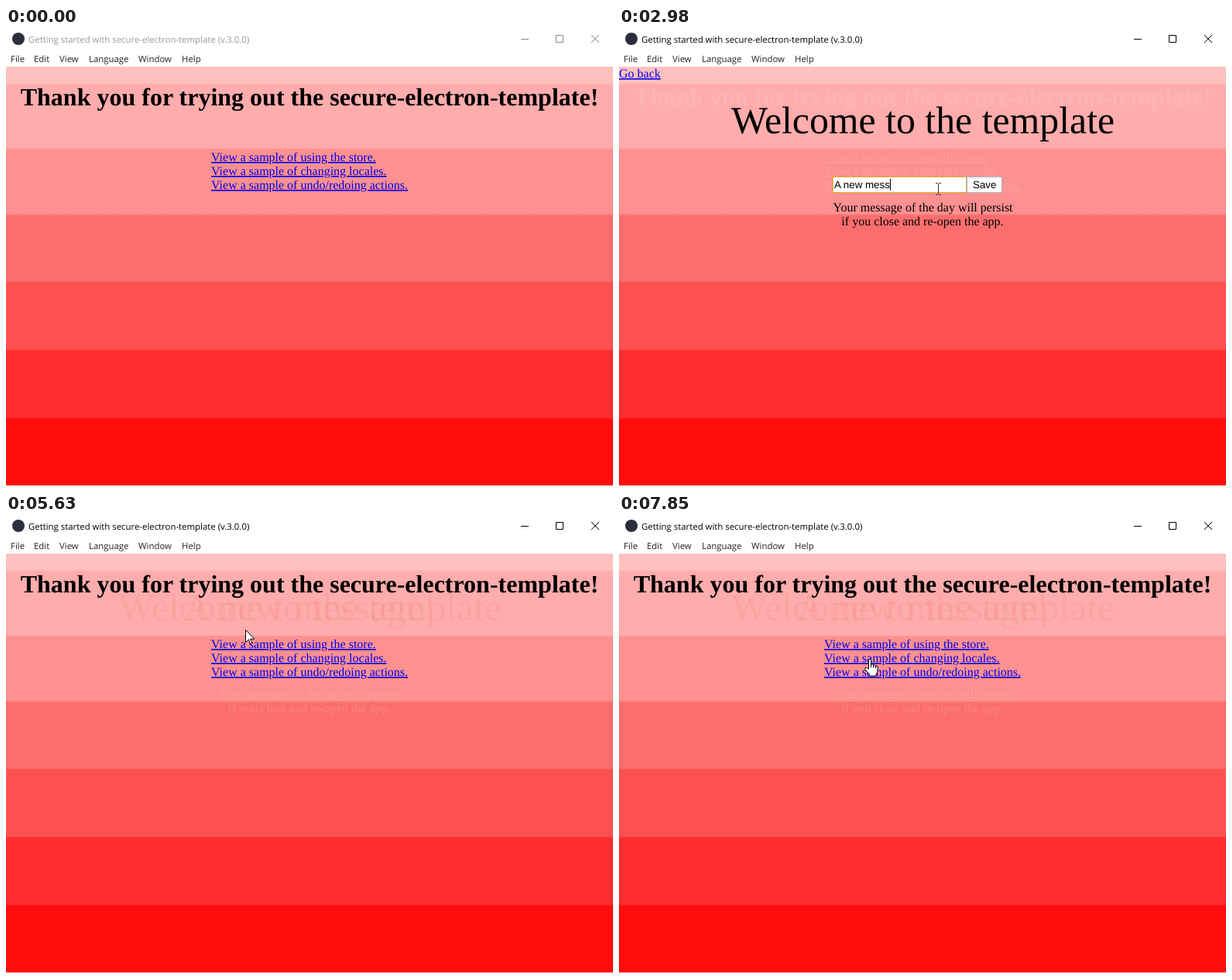
These frames come from a looping animation (784x593 px, 8000 ms). An HTML page:

```html
<!DOCTYPE html>
<html lang="en">
<head>
<meta charset="utf-8">
<title>Getting started</title>
<style>
  html, body { margin: 0; height: 100%; overflow: hidden; background: #fff; }
  #page {
    position: absolute; top: 50px; left: 0; width: 784px; height: 541px;
    background: linear-gradient(#ffc0c0 21px, #ffacac 23px 105px, #fd9090 107px 190px,
      #fc6e6e 192px 277px, #fd5050 279px 365px, #ff2e2e 367px 453px, #ff0d0d 455px);
  }
  svg { position: absolute; top: 0; left: 0; display: block; }
  text { font: 16px "Liberation Serif", "Times New Roman", serif; text-rendering: geometricPrecision; white-space: pre; }
  .chrome text { font: 11.4px "Open Sans", "Noto Sans", sans-serif; }
  .form text { font: 13.333px "Liberation Sans", Arial, sans-serif; }
  text.h1 { font-size: 32px; font-weight: bold; }
  text.motd { font-size: 49.8px; }
  .mid { text-anchor: middle; }
  .link { fill: var(--link, #00e); text-decoration: underline 1px; }
  .ghost { --link: currentColor; fill: currentColor; }
  .light { color: rgba(255, 215, 215, .2); }
  .dark { color: rgba(225, 85, 85, .1); }
  .cursor { fill: #fff; stroke: #000; stroke-linejoin: round; }
</style>
</head>
<body>
<div id="page"></div>
<svg width="784" height="593" viewBox="0 0 784 593">
  <defs>
    <g id="homeText">
      <text class="h1 mid" x="392" y="100">Thank you for trying out the secure-electron-template!</text>
      <text class="link" x="265" y="172">View a sample of using the store.</text>
      <text class="link" x="265" y="190">View a sample of changing locales.</text>
      <text class="link" x="265" y="208">View a sample of undo/redoing actions.</text>
    </g>
    <g id="note" class="mid">
      <text x="392.5" y="237">Your message of the day will persist</text>
      <text x="392" y="255">if you close and re-open the app.</text>
    </g>
    <text id="welcome" class="motd mid" x="392.5" y="136">Welcome to the template</text>
    <text id="message" class="motd mid" x="392.5" y="136">A new message!</text>
  </defs>

  <g class="chrome">
    <circle cx="16" cy="14" r="8" fill="#2b2e3b"/>
    <text id="title" x="29" y="19">Getting started with secure-electron-template (v.3.0.0)</text>
    <g fill="#222">
      <text x="6" y="44">File</text>
      <text x="36" y="44">Edit</text>
      <text x="69" y="44">View</text>
      <text x="107" y="44">Language</text>
      <text x="171" y="44">Window</text>
      <text x="227" y="44">Help</text>
    </g>
    <path id="buttons" fill="none" d="M665 14.5h10M710.5 9.5h9v9h-9zM756 9l10 10M766 9l-10 10"/>
  </g>

  <g id="home">
    <g id="homeGhost">
      <use class="ghost dark" href="#welcome"/>
      <use class="ghost dark" href="#message"/>
      <use class="ghost light" href="#note"/>
    </g>
    <use href="#homeText"/>
  </g>

  <g id="store">
    <use class="ghost light" href="#homeText"/>
    <use id="welcomeGhost" class="ghost dark" href="#welcome"/>
    <use id="welcomeNow" href="#welcome"/>
    <use id="messageNow" href="#message"/>
    <text class="link" x="0" y="64">Go back</text>
    <use href="#note"/>
    <g class="form">
      <rect id="field" x="276.5" y="192.5" width="172" height="20" fill="#fff"/>
      <rect id="ring" x="276" y="192" width="173" height="21" fill="none" stroke="#e0a040" stroke-width="1.6"/>
      <rect x="449.5" y="192.5" width="45" height="20" fill="#fff" stroke="#a9b4b8"/>
      <text x="457" y="207">Save</text>
      <text id="placeholder" x="278" y="207" fill="#757575">New message of the day</text>
      <text id="typed" x="278" y="207"></text>
      <rect id="caret" y="195" width="1" height="15"/>
    </g>
  </g>

  <path id="arrow" class="cursor" d="M.5.5v16l3.8-3.6 2.4 5.6 2.3-1-2.4-5.4h5.3z"/>
  <g id="hand" class="cursor">
    <path transform="translate(-7.5 -1)" d="M6 13V2.5a1.5 1.5 0 0 1 3 0V8q3-.8 3 1 2.6-.8 3 1 2.5-.5 2.5 1.5V16q0 3-2 5v2H7v-2L1.5 14.5q-1-1.8 1-2.2Q4 12 6 14zM9 8v4M12 9v3M15 10v3"/>
  </g>
  <path id="beam" fill="none" stroke="#333" d="M-3 -7.5h2.5l1 1 1-1H4M.5-6.5V6.5M-3 7.5h2.5l1-1 1 1H4"/>
</svg>

<script>
const LOOP = 8000, TICK = 77;
const APPEAR = 230, ACTIVATE = 770, FOCUS = 1410, TYPE = 1870, SAVE = 3900;
const KEY_INTERVAL = 123;
const MESSAGE = 'A new message!';
const clicks = [850, 5160, 5950, 7060]; // each one swaps home and store

// The pointer goes straight from stop to stop, one step per tick.
const entry = { x: 604, y: 433 };
const moves = [
  { start: APPEAR, ticks: 5, x: 427, y: 160 },
  { start: clicks[0], ticks: 5, x: 412, y: 208 },
  { start: 4370, ticks: 4, x: 3, y: 74 },
  { start: 4850, ticks: 2, x: 14, y: 60 },
  { start: 5320, ticks: 4, x: 309, y: 148 },
  { start: 5630, ticks: 2, x: 316, y: 165 },
  { start: 6340, ticks: 5, x: 107, y: 91 },
  { start: 6740, ticks: 2, x: 42, y: 62 },
  { start: 7210, ticks: 8, x: 324, y: 186 },
];

const $ = id => document.getElementById(id);
const show = (id, on) => { $(id).style.display = on ? '' : 'none'; };
const clamp = (v, lo, hi) => Math.min(hi, Math.max(lo, v));
const isStore = t => clicks.filter(time => t >= time).length % 2 === 1;

function drawWindow(t) {
  const active = t >= ACTIVATE;
  $('title').setAttribute('fill', active ? '#000' : '#999');
  $('buttons').setAttribute('stroke', active ? '#000' : '#888');
}

function drawPages(t) {
  const saved = t >= SAVE;
  show('home', !isStore(t));
  show('store', isStore(t));
  show('homeGhost', saved);
  show('welcomeNow', !saved);
  show('messageNow', saved);
  show('welcomeGhost', saved);
}

function drawField(t) {
  const focused = t >= FOCUS && t < clicks[1];
  const keys = Math.floor((t - TYPE) / KEY_INTERVAL) + 1;
  const count = t < SAVE ? clamp(keys, 0, MESSAGE.length) : 0;
  const typed = $('typed');
  typed.textContent = MESSAGE.slice(0, count);
  show('placeholder', !count);
  show('ring', focused);
  show('caret', focused);
  $('field').setAttribute('stroke', focused ? 'none' : '#a9a9a9');
  const width = count ? typed.getComputedTextLength() : 0;
  $('caret').setAttribute('x', 278 + Math.round(width));
}

function pointerAt(t) {
  let { x, y } = entry;
  for (const move of moves) {
    const progress = clamp(Math.floor((t - move.start) / TICK) / move.ticks, 0, 1);
    x += (move.x - x) * progress;
    y += (move.y - y) * progress;
  }
  return { x, y };
}

function pointerShape({ x, y }, store) {
  const inside = (left, top, right, bottom) => x >= left && x < right && y >= top && y < bottom;
  if (!store) return inside(265, 158, 519, 212) ? 'hand' : 'arrow';
  if (inside(0, 50, 54, 68)) return 'hand';
  return inside(276, 192, 449, 213) ? 'beam' : 'arrow';
}

function drawPointer(t) {
  const point = pointerAt(t);
  const current = pointerShape(point, isStore(t));
  for (const shape of ['arrow', 'hand', 'beam']) show(shape, t >= APPEAR && shape === current);
  $(current).setAttribute('transform', `translate(${Math.round(point.x)} ${Math.round(point.y)})`);
}

const start = performance.now();
function frame() {
  const t = (performance.now() - start) % LOOP;
  drawWindow(t);
  drawPages(t);
  drawField(t);
  drawPointer(t);
  requestAnimationFrame(frame);
}
frame();
</script>
</body>
</html>
```
